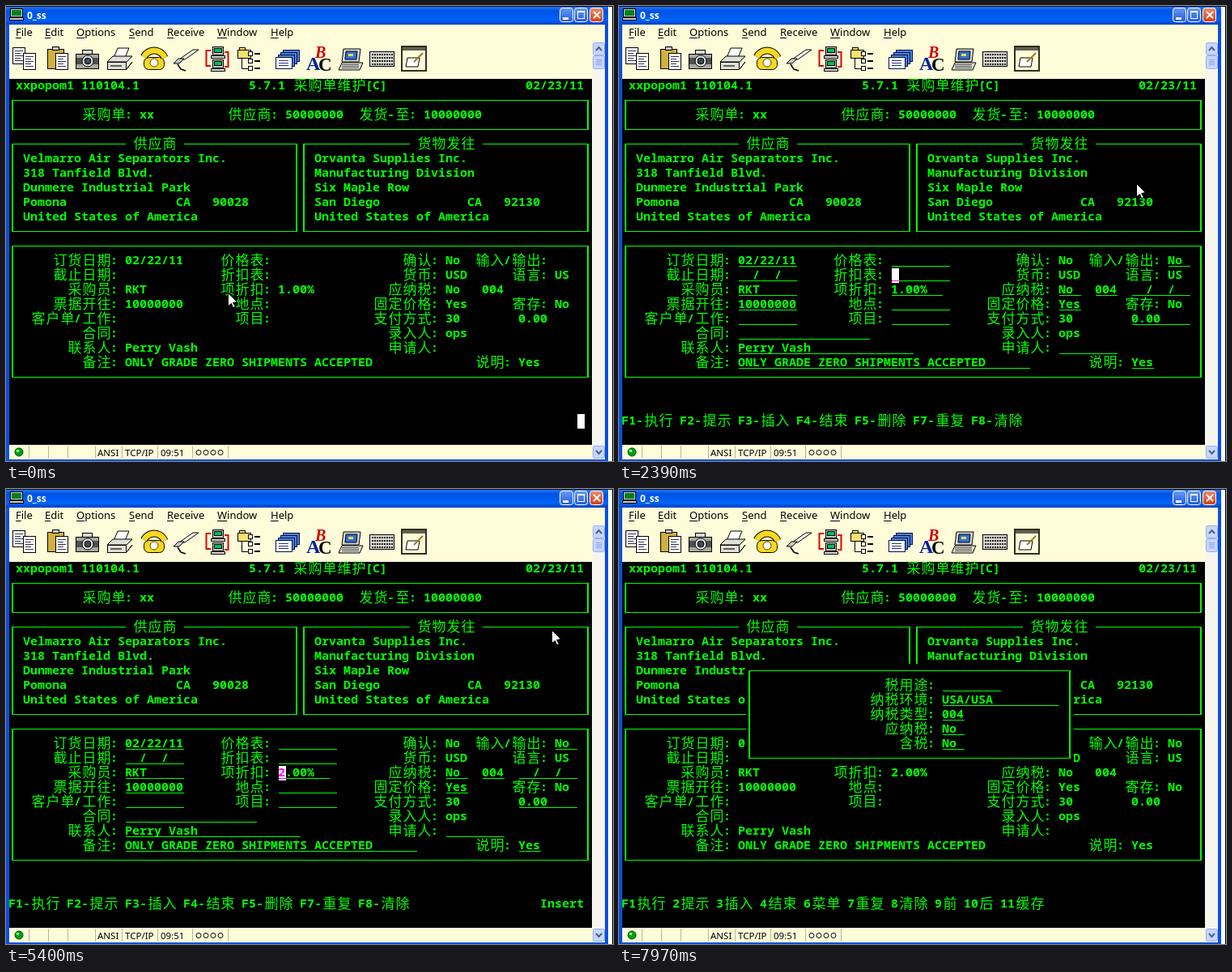
These frames come from a looping animation (750 by 562 pixels, 8000 ms). An HTML page with a canvas:

```html
<!DOCTYPE html>
<html lang="zh-CN">
<head>
<meta charset="utf-8">
<title>Terminal</title>
<style>
html, body { margin: 0; width: 100%; height: 100%; overflow: hidden; background: #000; }
canvas { display: block; }
</style>
</head>
<body>
<canvas id="stage" width="750" height="562"></canvas>
<script>
const LOOP = 8000, W = 750, H = 562;
const X0 = 4, Y0 = 90, CW = 9, CH = 18;
const GREEN = '#00ff00', CREAM = '#fffdd9', BLUE = '#0a50e0';
const MONO = '600 15px "Noto Sans Mono", monospace';
const HAN = '300 17px "Noto Sans CJK SC", "Noto Sans CJK", sans-serif';
const UI = '"Noto Sans", sans-serif';

const stage = document.getElementById('stage').getContext('2d');
const chrome = document.createElement('canvas');
chrome.width = W;
chrome.height = H;
let g = chrome.getContext('2d');

// ---- drawing helpers ----
function rect(x, y, w, h, fill) {
  g.fillStyle = fill;
  g.fillRect(x, y, w, h);
}

function frame(x, y, w, h, fill, line = '#000') {
  rect(x, y, w, h, line);
  rect(x + 1, y + 1, w - 2, h - 2, fill);
}

function trace(pts) {
  g.beginPath();
  for (let i = 0; i < pts.length; i += 2) g.lineTo(pts[i], pts[i + 1]);
}

function paint(fill, line, width = 1) {
  g.fillStyle = fill;
  g.strokeStyle = line;
  g.lineWidth = width;
  if (fill) g.fill();
  if (line) g.stroke();
}

function path(pts, line, width) {
  trace(pts);
  paint(null, line, width);
}

function poly(pts, fill, line = '#000') {
  trace(pts);
  g.closePath();
  paint(fill, line);
}

// parallelogram whose top edge is shifted by lean
function slab(x, y, w, h, lean, fill) {
  poly([x + lean, y, x + w + lean, y, x + w, y + h, x, y + h], fill);
}

function disc(x, y, r, fill, line) {
  g.beginPath();
  g.arc(x, y, r, 0, 7);
  paint(fill, line);
}

function roundBox(x, y, w, h, r, fill, line) {
  g.beginPath();
  g.roundRect(x + .5, y + .5, w - 1, h - 1, r);
  paint(fill, line);
}

function label(s, x, y, font, fill = '#000') {
  g.font = font;
  g.fillStyle = fill;
  g.textAlign = 'left';
  g.fillText(s, x, y);
}

function fade(y1, y2, ...colors) {
  const f = g.createLinearGradient(0, y1, 0, y2);
  colors.forEach((c, i) => f.addColorStop(i / (colors.length - 1), c));
  return f;
}

// ---- toolbar icons, each drawn from its own left edge ----
function sheet(x, y) {
  frame(x, y, 16, 21, '#fff');
  for (let i = 4; i < 18; i += 3) rect(x + 3, y + i, 10 - i % 2 * 3, 1, '#303050');
}

function monitor(x, y, w, h, screen) {
  frame(x, y, w, h, '#c8c8c0');
  frame(x + 2, y + 2, w - 4, h - 5, screen);
  frame(x - 2, y + h, w + 4, 4, '#d8d8d0');
}

function pages() {
  sheet(0, 1);
  sheet(13, 8);
}

function clipboard() {
  frame(0, 3, 21, 25, '#d0b040');
  frame(6, 0, 9, 5, '#c8c8c8');
  sheet(10, 8);
}

function camera() {
  frame(8, 4, 13, 6, '#d8d8d0');
  frame(0, 9, 29, 19, '#a8a8a0');
  rect(1, 14, 27, 8, '#505050');
  disc(15, 18, 7, '#e8e8e8', '#000');
  disc(15, 18, 4, '#404850', '#000');
}

function printer() {
  slab(8, 2, 14, 12, 5, '#fff');
  slab(0, 12, 24, 7, 7, '#e0e0d8');
  frame(0, 19, 24, 10, '#e0e0d8');
  slab(24, 19, 0, 9, 7, '#000');
  rect(4, 23, 14, 2, '#606060');
}

function phone() {
  roundBox(3, 13, 26, 16, 6, '#f8d820', '#000');
  for (const [color, width] of [['#000', 9], ['#f8d820', 7]]) {
    g.beginPath();
    g.arc(16, 19, 14, 3.6, 5.9);
    paint(null, color, width);
  }
  disc(16, 20, 5, '#fff', '#604800');
}

function plug() {
  slab(7, 4, 7, 12, 17, '#f4f4ec');
  slab(0, 15, 7, 6, 6, '#c8c8c8');
  path([5, 22, 9, 28, 15, 30], '#000', 1.5);
}

function network() {
  path([6, 5, .5, 5, .5, 24, 6, 24], '#e00000', 2);
  path([23, 7, 27.5, 7, 27.5, 25, 23, 25], '#e00000', 2);
  monitor(8, 0, 14, 11, '#00c060');
  monitor(8, 16, 14, 11, '#00c060');
}

function tree() {
  frame(2, 1, 8, 4, '#f8e070');
  frame(0, 4, 17, 11, '#f8e070');
  path([5.5, 15, 5.5, 27.5, 13, 27.5], '#000');
  for (let y = 6; y < 30; y += 9) {
    frame(13, y, 6, 6, '#fff');
    rect(21, y + 2, 7, 2, '#000');
  }
}

function cards() {
  for (let i = 0; i < 4; i++) frame(9 - 3 * i, 4 + 3 * i, 21, 15, i < 3 ? '#5080d0' : '#fff', '#001050');
  for (let y = 17; y < 25; y += 3) rect(4, y, 12, 1, '#203080');
}

function letters() {
  label('A', 0, 29, 'bold 24px "Liberation Serif", serif', '#0020a0');
  label('B', 11, 14, 'bold italic 20px "Liberation Serif", serif', '#d00000');
  label('C', 15, 30, 'bold 23px "Liberation Serif", serif');
}

function laptop() {
  slab(4, 3, 21, 16, 2, '#d8d8d0');
  slab(8, 6, 14, 10, 1, '#3070e0');
  rect(12, 9, 6, 3, '#f0e020');
  slab(0, 20, 26, 9, 4, '#e0e0d8');
  for (let y = 22.5; y < 28; y += 2) path([4, y, 25, y], '#555');
}

function keyboard() {
  frame(0, 6, 31, 19, '#d8d8d0');
  for (let y = 9; y < 22; y += 4)
    for (let x = 3; x < 28; x += 3) rect(x, y, 2, 2, '#202020');
}

function chart() {
  rect(0, -1, 32, 32, '#303020');
  rect(2, 1, 28, 28, CREAM);
  rect(2, 1, 28, 4, '#606050');
  slab(6, 14, 15, 11, 2, '#fff');
  path([16, 19, 27, 8], '#a07820', 2);
}

const ICONS = {
  8: pages, 51: clipboard, 86: camera, 125: printer, 167: phone, 207: plug, 247: network,
  286: tree, 333: cards, 371: letters, 411: laptop, 449: keyboard, 488: chart
};

// ---- window chrome ----
function chevron(y, dir) {
  roundBox(725, y, 15, 16, 2, '#c6d6fc', '#98b0e8');
  path([729, y + 8 + 2 * dir, 732.5, y + 8 - 2 * dir, 736, y + 8 + 2 * dir], '#4d6185', 2);
}

function titleBar() {
  rect(0, 0, 744, 23, fade(0, 23, '#2a80f8', '#0054e4', '#0058ee', '#0064fa', '#0040c0'));
  rect(0, 0, W, 1, '#101020');
  frame(5, 3, 16, 11, '#d0d0c0');
  rect(7, 5, 12, 7, '#008020');
  frame(4, 14, 18, 4, '#c8c8b8');
  label('0_ss', 26, 16, 'bold 12px ' + UI, '#fff');

  for (const x of [684, 702, 721]) {
    const tint = x > 720 ? ['#f09070', '#d03c14'] : ['#6a9cf8', '#2058e0'];
    roundBox(x, 2, 17, 18, 3, fade(2, 20, ...tint), '#fff');
  }
  rect(688, 14, 7, 3, '#fff');
  g.strokeRect(706.5, 6.5, 8, 9);
  rect(706, 6, 9, 2, '#fff');
  path([726, 7, 734, 15], '#fff', 2);
  path([734, 7, 726, 15], '#fff', 2);
}

function drawChrome() {
  rect(0, 0, W, H, BLUE);
  rect(744, 1, 5, 561, '#fff');
  rect(749, 0, 1, H, '#000');
  titleBar();

  rect(4, 23, 736, 537, CREAM);
  const menu = { File: 12, Edit: 48, Options: 87, Send: 152, Receive: 199, Window: 261, Help: 327 };
  for (const name in menu) {
    label(name, menu[name], 37, '13px ' + UI);
    rect(menu[name], 39, g.measureText(name[0]).width, 1, '#000');
  }
  for (const x in ICONS) {
    g.save();
    g.translate(x, 50);
    ICONS[x]();
    g.restore();
  }

  rect(724, 44, 16, 516, '#f6f5ee');
  chevron(45, 1);
  roundBox(725, 61, 15, 17, 2, '#c6d6fc', '#98b0e8');
  for (let y = 66; y < 74; y += 2) rect(729, y, 7, 1, '#8ca8e8');
  chevron(543, -1);

  for (const x of [28, 52, 76, 110, 143, 187, 230, 274]) rect(x, 543, 1, 16, '#b8b69c');
  disc(16, 551, 5, '#00a010', '#005008');
  disc(14.5, 549.5, 1.8, '#90ff90');
  const status = { 'ANSI': 113, 'TCP/IP': 147, '09:51': 191 };
  for (const s in status) label(s, status[s], 556, '11.5px ' + UI);
  for (let x = 238; x < 270; x += 9) disc(x, 551.5, 3, null, '#000');

  rect(X0, Y0, 720, 452, '#000');
}

// ---- terminal ----
const colX = c => X0 + CW * c, rowY = r => Y0 + CH * r;
const isWide = ch => ch > '\u2e80';
const cells = s => [...s].reduce((n, ch) => n + (isWide(ch) ? 2 : 1), 0);

// An input field: braces mark its extent, bars are slashes shown only while editing.
const field = (len, value = '') => `{${value.padEnd(len)}}`;
const DATE = field(8, '  |  |');

function put(col, row, s, edit) {
  let inField = false;
  g.textAlign = 'center';
  for (let ch of s) {
    if (ch === '{' || ch === '}') {
      inField = ch === '{';
      continue;
    }
    if (ch === '|') ch = edit ? '/' : ' ';
    if (inField && edit) rect(colX(col), rowY(row) + 15, CW, 1, GREEN);
    const wide = isWide(ch);
    g.font = wide ? HAN : MONO;
    g.fillStyle = GREEN;
    g.fillText(ch, colX(col) + (wide ? 9 : 3.5), rowY(row) + (wide ? 14 : 13));
    col += wide ? 2 : 1;
  }
}

// Labels end with a colon in the given column, values start two cells later.
function putPair(colon, row, name, value, edit) {
  if (name) put(colon - cells(name), row, name + ':');
  put(colon + 2, row, value, edit);
}

function box(c1, r1, c2, r2, title) {
  const x1 = colX(c1) + 3, x2 = colX(c2) + 3, y1 = rowY(r1) + 8, y2 = rowY(r2) + 8;
  for (const y of [y1, y2]) rect(x1, y, x2 - x1 + 2, 1, GREEN);
  for (const x of [x1, x2]) rect(x, y1, 2, y2 - y1 + 1, GREEN);
  if (title) {
    const len = cells(title), at = Math.floor((c1 + c2 + 1 - len) / 2);
    rect(colX(at - 1), rowY(r1), CW * (len + 2), CH, '#000');
    put(at, r1, title);
  }
}

const cityLine = (city, zip) => city.padEnd(21) + 'CA   ' + zip;
const SUPPLIER = ['Velmarro Air Separators Inc.', '318 Tanfield Blvd.', 'Dunmere Industrial Park',
  cityLine('Pomona', '90028'), 'United States of America'];
const SHIP_TO = ['Orvanta Supplies Inc.', 'Manufacturing Division', 'Six Maple Row',
  cityLine('San Diego', '92130'), 'United States of America'];

const COLONS = [14, 35, 58, 73];
const formRows = (discount, output) => [
  ['订货日期', field(8, '02/22/11'), '价格表', field(8), '确认', 'No', '输入/输出', output],
  ['截止日期', DATE, '折扣表', field(8), '货币', 'USD', '语言', 'US'],
  ['采购员', field(8, 'RKT'), '项折扣', field(7, discount), '应纳税', `${field(3, 'No')}  ${field(3, '004')}  ${DATE}`],
  ['票据开往', field(8, '10000000'), '地点', field(8), '固定价格', field(3, 'Yes'), '寄存', 'No'],
  ['客户单/工作', field(8), '项目', field(8), '支付方式', '30'.padEnd(10) + field(8, '0.00')],
  ['合同', field(18), '', '', '录入人', 'ops'],
  ['联系人', field(24, 'Perry Vash'), '', '', '申请人', field(8)],
  ['备注', field(40, 'ONLY GRADE ZERO SHIPMENTS ACCEPTED'), '', '', '', '    说明: ' + field(3, 'Yes')]
];

const POPUP = [['税用途', field(8)], ['纳税环境', field(16, 'USA/USA')], ['纳税类型', field(3, '004')],
  ['应纳税', field(3, 'No')], ['含税', field(3, 'No')]];

const EDIT_KEYS = 'F1-执行 F2-提示 F3-插入 F4-结束 F5-删除 F7-重复 F8-清除';
const POPUP_KEYS = 'F1执行 2提示 3插入 4结束 6菜单 7重复 8清除 9前 10后 11缓存';

function drawForm(t) {
  const edit = t >= 100 && t < 6450, typed = t >= 3790;
  put(1, 0, 'xxpopom1 110104.1');
  put(33, 0, '5.7.1 采购单维护[C]');
  put(71, 0, '02/23/11');
  box(0, 1, 79, 3);
  putPair(16, 2, '采购单', 'xx');
  putPair(36, 2, '供应商', '50000000');
  putPair(55, 2, '发货-至', '10000000');

  box(0, 4, 39, 10, '供应商');
  box(40, 4, 79, 10, '货物发往');
  SUPPLIER.forEach((s, i) => put(2, 5 + i, s));
  SHIP_TO.forEach((s, i) => put(42, 5 + i, s));

  box(0, 11, 79, 20);
  formRows(typed ? '2.00%' : '1.00%', t < 100 ? '' : field(3, 'No')).forEach((row, r) => {
    for (let i = 0; i < row.length; i += 2) putPair(COLONS[i / 2], 12 + r, row[i], row[i + 1], edit);
  });
  if (edit) put(0, 23, EDIT_KEYS);
  if (edit && typed) put(73, 23, 'Insert');
}

function drawPopup() {
  rect(colX(17), rowY(7), CW * 45, CH * 7, '#000');
  box(17, 7, 61, 13);
  POPUP.forEach(([name, value], i) => putPair(42, 8 + i, name, value, true));
}

// ---- motion ----
const BLINK = 540, STEP = 105;

// time, column, row: the cursor lights up here and goes dark after one blink
const STOPS = [
  [0, 78, 23], [100, 16, 12], [640, 16, 13], [1140, 16, 14], [1350, 16, 15], [1450, 16, 16], [1970, 16, 17],
  [2290, 37, 12], [2390, 37, 13], [2690, 37, 14], [3790, 37, 14], [5400, 37, 14], [5700, 37, 14],
  [6450, 62, 13], [7430, 44, 8]
];

const GLIDES = [
  { show: 0, go: 280, stop: 800, hide: 800, from: [274, 354], to: [760, 306] },
  { show: 1660, go: 1700, stop: 2290, hide: 3880, from: [747, 276], to: [639, 219] },
  { show: 4860, go: 4990, stop: 5400, hide: 6150, from: [638, 219], to: [674, 174] }
];

function drawCursor(t) {
  const [at, col, row] = STOPS.findLast(s => s[0] <= t);
  if (t - at >= BLINK) return;
  g.globalCompositeOperation = 'difference';
  rect(colX(col), rowY(row), CW, CH, '#fff');
  g.globalCompositeOperation = 'source-over';
}

function drawPointer(t) {
  const m = GLIDES.find(m => t >= m.show && t < m.hide);
  if (!m) return;
  const steps = Math.round((m.stop - m.go) / STEP);
  const p = Math.min(1, Math.max(0, Math.floor((t - m.go) / (m.stop - m.go) * steps) / steps));
  const ease = p * p * (3 - 2 * p);
  const [x, y] = m.from.map((v, i) => Math.round(v + (m.to[i] - v) * ease));
  g.save();
  g.beginPath();
  g.rect(0, 0, W - 1, H);
  g.clip();
  g.translate(x + .5, y + .5);
  poly([0, 0, 0, 16, 4, 13, 6, 18, 9, 17, 6, 12, 11, 11], '#fff');
  g.restore();
}

function draw(t) {
  g.drawImage(chrome, 0, 0);
  drawForm(t);
  if (t >= 6770) drawPopup();
  if (t >= 6880) put(0, 23, POPUP_KEYS);
  drawCursor(t);
  drawPointer(t);
}

drawChrome();
g = stage;
const start = performance.now();
function tick() {
  draw((performance.now() - start) % LOOP);
  requestAnimationFrame(tick);
}
tick();
</script>
</body>
</html>
```
